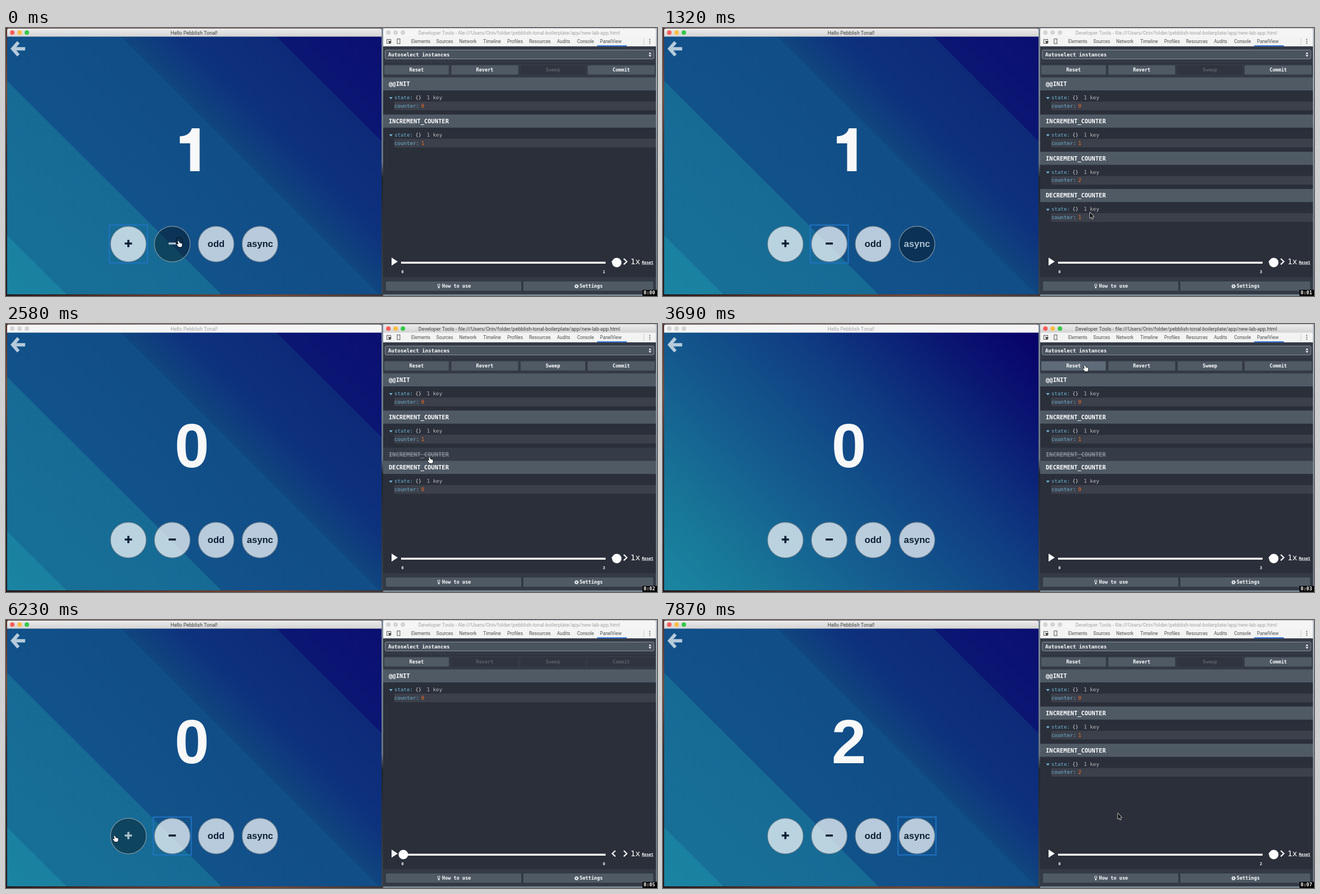
An HTML page with a canvas that plays this animation: 1165x481 px, repeating every 8 s.

```html
<!DOCTYPE html>
<html lang="en">
<head>
<meta charset="utf-8">
<title>Counter and log panel</title>
<style>
html, body { margin: 0; width: 100%; height: 100%; overflow: hidden; background: #333a42; }
canvas { display: block; }
</style>
</head>
<body>
<canvas id="stage" width="1165" height="481"></canvas>
<script>
const c = document.getElementById('stage').getContext('2d');
const LOOP = 8000;
const MONO = '"DejaVu Sans Mono", "Noto Sans Mono", monospace';
const UI = 'Roboto, "Open Sans", sans-serif';
const BOLD = '"Liberation Sans", Arial, sans-serif';
const BG = '#2a2f3a', BAR = '#343a45', BTN = '#4f5a65', BLUE = '#6fb3d2', ORANGE = '#fc6d24';

// Pointer stops: time, x, y of the hot spot
const PATH = [
  [0, 309, 382], [230, 309, 382], [400, 214, 384], [700, 214, 384], [780, 298, 383],
  [1170, 298, 383], [1320, 764, 331], [1480, 843, 302], [1700, 758, 239], [2700, 758, 239],
  [3050, 752, 54], [3370, 755, 74], [4700, 755, 74], [4880, 789, 293], [5500, 789, 293],
  [5850, 172, 391], [6030, 194, 387], [6940, 200, 387], [7100, 200, 387], [7250, 455, 384],
  [7600, 455, 384], [7740, 814, 347], [LOOP, 814, 347]
];
const CLICKS = [-70, 550, 930, 1850, 2120, 4350, 5980, 6330, 6700, 7330];
const TICKS = [1170, 2170, 3170, 4170, 5140, 6330, 7150];
const BUTTONS = [219, 297.5, 376, 454.5];
const ROW = 66.8, HEAD = 23.5, TOP = 88.5;
// A one without a foot, which the bold face lacks
const ONE = new Path2D('M346.5 257H329.5V207H311V194.5Q329 193.5 332.5 180H346.5Z');

function pointer(t) {
  let i = 1;
  while (i < PATH.length - 1 && t > PATH[i][0]) i++;
  const [t0, x0, y0] = PATH[i - 1], [t1, x1, y1] = PATH[i];
  let k = Math.max(0, Math.min(1, (t - t0) / (t1 - t0)));
  k = k * k * (3 - 2 * k);
  return [x0 + (x1 - x0) * k, y0 + (y1 - y0) * k];
}

const inc = n => ({ name: 'INCREMENT_COUNTER', n });
function entries(t) {
  const list = [{ name: '@@INIT', n: 0 }];
  if (t < 4410) {
    list.push(inc(1));
    if (t >= 630) list.push({ ...inc(2), skipped: t >= 2430 });
    if (t >= 1010) list.push({ name: 'DECREMENT_COUNTER', n: t >= 2430 ? 0 : 1 });
  } else {
    if (t >= 6450) list.push(inc(1));
    if (t >= 6820) list.push(inc(2));
  }
  let y = TOP;
  for (const e of list) { e.y = y; y += e.skipped ? HEAD : ROW; }
  return list;
}

function rect(x, y, w, h, color) { c.fillStyle = color; c.fillRect(x, y, w, h); }
function box(x, y, w, h, r, fill, stroke) {
  c.beginPath(); c.roundRect(x, y, w, h, r);
  c.fillStyle = fill; c.fill();
  if (stroke) { c.strokeStyle = stroke; c.lineWidth = 1; c.stroke(); }
}
function disc(x, y, r, color) {
  c.beginPath(); c.arc(x, y, r, 0, 7); c.fillStyle = color; c.fill();
}
function line(color, width, ...p) {
  c.beginPath();
  for (let i = 0; i < p.length; i += 2) c.lineTo(p[i], p[i + 1]);
  c.strokeStyle = color; c.lineWidth = width; c.stroke();
}
function poly(color, ...p) {
  c.beginPath();
  for (let i = 0; i < p.length; i += 2) c.lineTo(p[i], p[i + 1]);
  c.closePath(); c.fillStyle = color; c.fill();
}
function text(s, x, y, font, color, align = 'left') {
  c.font = font; c.fillStyle = color; c.textAlign = align; c.fillText(s, x, y);
}
function shade(x0, y0, x1, y1, stops) {
  const g = c.createLinearGradient(x0, y0, x1, y1);
  stops.forEach(([p, color]) => g.addColorStop(p, color));
  return g;
}
// Diagonal shade, stops given as x - y
const diagonal = stops => shade(0, 478, 567.5, -89.5, stops.map(([d, color]) => [(d + 478) / 1135, color]));

const crisp = diagonal([
  [-478, '#1a84a1'], [-371, '#1a81a0'], [-369, '#176f97'], [-94, '#166b95'], [-92, '#12528a'],
  [189, '#114d87'], [191, '#10467f'], [300, '#0e317d'], [468, '#0d2a79'], [470, '#0b1673'], [657, '#0a0f70']
]);
const smooth = diagonal([
  [-478, '#1a86a2'], [-300, '#187798'], [-93, '#155f90'], [60, '#124f89'],
  [200, '#103f83'], [330, '#0d2c7b'], [470, '#0a1672'], [657, '#080068']
]);

function desktop() {
  rect(0, 0, 1165, 481, shade(0, 0, 0, 481, [[0, '#b4bcc6'], [.5, '#7f8b97'], [1, '#6b7782']]));
  rect(0, 0, 675, 2, shade(0, 0, 675, 0, [[0, '#4a2f2b'], [.5, '#6a4a42'], [1, '#4a4048']]));
  rect(0, 0, 2, 481, shade(0, 0, 0, 481, [[0, '#54302a'], [.25, '#7c4a3a'], [.5, '#35242a'], [1, '#23181c']]));
  rect(672, 0, 3, 481, shade(0, 0, 0, 481, [[0, '#7d8a96'], [.5, '#66737e'], [.56, '#20252c'], [1, '#39434d']]));
  rect(0, 478, 675, 3, shade(0, 0, 675, 0, [[0, '#23181c'], [.3, '#543229'], [.7, '#6f4638'], [1, '#3d3436']]));
  rect(675, 478, 490, 3, '#75848f');
}

function titleBar(x, w, title, active, cx) {
  box(x, 1, w, 18, [3, 3, 0, 0], active ? shade(0, 1, 0, 15, [[0, '#ececec'], [1, '#d4d4d4']]) : '#f5f5f5');
  ['#fc5b57', '#fdbc40', '#34c84a'].forEach((color, i) => disc(x + 9.3 + 13 * i, 8.3, 4, active ? color : '#d4d4d4'));
  text(title, cx, 12, '9px ' + UI, active ? '#3c3c3c' : '#a2a2a2', 'center');
}

function leftWindow(t, active, value, hover) {
  titleBar(2, 670, 'Hello Pebblish Tonal!', active, 336.5);
  rect(2, 15.5, 670, 462.5, t >= 3570 && t < 6030 ? smooth : crisp);
  const pale = '#b6cadb';
  line(pale, 6, 22.2, 25.5, 12, 37.3, 22.2, 49.1);
  line(pale, 6, 13, 37.3, 34.3, 37.3);
  if (value === 1) { c.fillStyle = '#f8f8f8'; c.fill(ONE); }
  else text(value, 332.7, 257, 'bold 111px ' + BOLD, '#f8f8f8', 'center');

  BUTTONS.forEach((x, i) => {
    const over = i === hover, ink = over ? '#a9bfcd' : '#0b2036';
    c.beginPath(); c.arc(x, 387.8, 32, 0, 7);
    c.fillStyle = over ? 'rgba(0,0,0,.37)' : 'rgba(255,255,255,.7)'; c.fill();
    c.strokeStyle = over ? '#8496a2' : '#63788a'; c.lineWidth = 1.2; c.stroke();
    if (i < 2) line(ink, 3.6, x - 6.5, 386.8, x + 6.5, 386.8);
    if (i === 0) line(ink, 3.6, x, 380.3, x, 393.3);
    if (i > 1) text(i === 2 ? 'odd' : 'async', x, 393.3, 'bold 16.6px ' + BOLD, ink, 'center');
  });

  if (active) {
    const focus = t < 930 ? 0 : t < 6330 ? 1 : t < 7330 ? 0 : 3;
    c.strokeStyle = '#2073c2'; c.lineWidth = 2;
    c.strokeRect(BUTTONS[focus] - 34, 353.6, 68, 68);
  }
}

function button(label, x, x1, y, enabled, over) {
  box(x, y, x1 - x, 16.5, 1, enabled ? (over ? '#5f6b78' : BTN) : '#2f343f');
  text(label, (x + x1) / 2, y + 11.3, 'bold 8.6px ' + MONO, enabled ? '#fff' : '#59616b', 'center');
}

function devTools(t, active, list, overReset) {
  titleBar(675, 488, 'Developer Tools - file:///Users/Orin/folder/pebblish-tonal-boilerplate/app/new-lab-app.html', active, 918.5);
  rect(675, 15.5, 488, 17.5, '#f3f3f3');
  rect(675, 32.5, 488, .7, '#c8c8c8');
  c.strokeStyle = '#555'; c.lineWidth = 1;
  c.strokeRect(681.5, 20.5, 7, 7);
  poly('#333', 684, 22.5, 690.5, 25, 687.6, 26, 686.5, 29);
  c.strokeRect(700, 19.5, 5, 8.5);
  const tabs = { Elements: 725, Sources: 770, Network: 811, Timeline: 854, Profiles: 897, Resources: 936, Audits: 986, Console: 1022, PanelView: 1063 };
  for (const name in tabs) text(name, tabs[name], 27, '8.3px ' + UI, '#4c4c4c');
  rect(1058, 31, 53, 2, '#3879d9');
  rect(1141, 18, 1, 12, '#ccc');
  for (const y of [20.5, 24, 27.5]) disc(1152, y, 1, '#555');

  rect(675, 33, 488, 445, BG);
  rect(675, 33, 488, 30, BAR);
  box(678.5, 39.5, 481, 16, 2, '#4a545f', '#89919a');
  text('Autoselect instances', 684, 50.8, 'bold 9.15px ' + MONO, '#fff');
  poly('#fff', 1150, 46.6, 1155, 46.6, 1152.5, 43.4);
  poly('#fff', 1150, 48.6, 1155, 48.6, 1152.5, 51.8);
  rect(675, 64, 488, 24, BAR);
  const changed = list.length > 1;
  button('Reset', 677, 792.5, 67, true, overReset);
  button('Revert', 797, 916.5, 67, changed);
  button('Sweep', 921, 1036.5, 67, list.some(e => e.skipped));
  button('Commit', 1041, 1161, 67, changed);

  for (const { name, n, y, skipped } of list) {
    rect(675, y, 488, HEAD, skipped ? '#353c47' : BTN);
    text(name, 685, y + 15.4, 'bold 10.5px ' + MONO, skipped ? '#858c94' : '#fff');
    if (skipped) { rect(685, y + 11.6, 107, 1, '#858c94'); continue; }
    poly(BLUE, 685.5, y + 35.5, 692, y + 35.5, 688.7, y + 39.5);
    const row = '9.2px ' + MONO;
    text('state:', 695, y + 39.5, row, BLUE);
    text('{}', 732.5, y + 39.5, row, '#d0d0d0');
    text('1 key', 753, y + 39.5, row, '#b8b8b8');
    rect(694.5, y + 43.5, 468.5, 15.5, '#3c404b');
    text('counter:', 695, y + 54.2, row, BLUE);
    text(n, 743, y + 54.2, row, ORANGE);
  }

  poly('#fff', 690, 412, 701, 419.2, 690, 426.4);
  rect(707, 419.5, 366, 3.4, '#fff');
  line('#fff', 2.2, 1090.5, 414, 1085, 419.2, 1090.5, 424.4);
  line('#fff', 2.2, 1105.5, 414, 1111, 419.2, 1105.5, 424.4);
  disc(changed ? 1093 : 711, 421, 8.5, '#fff');
  text('0', 709.5, 440, 'bold 7px ' + MONO, '#fff', 'center');
  text(list.length - 1, 1070, 440, 'bold 7px ' + MONO, '#fff', 'center');
  text('1x', 1117.5, 424, '14.5px ' + MONO, '#fff');
  text('Reset', 1138, 422.5, 'bold 6.8px ' + MONO, '#fff');
  rect(1138, 423.7, 20.5, .8, '#fff');

  rect(675, 447, 488, 31, BAR);
  button('  How to use', 680, 922, 455, true);
  button('  Settings', 926, 1158, 455, true);
  c.strokeStyle = '#fff'; c.lineWidth = 1;
  c.beginPath(); c.arc(774.5, 461.7, 2.1, 0, 7); c.stroke();
  rect(773.3, 464.5, 2.4, 2.5, '#fff');
  c.lineWidth = 2; c.setLineDash([1.2, 1]);
  c.beginPath(); c.arc(1021, 463.6, 2.8, 0, 7); c.stroke();
  c.setLineDash([]); c.lineWidth = 1.4;
  c.beginPath(); c.arc(1021, 463.6, 2, 0, 7); c.stroke();
}

function cursor(x, y, hand, ripple) {
  if (ripple) {
    c.beginPath(); c.arc(x + 1, y - .3, 6, 0, 7);
    c.strokeStyle = '#10161c'; c.lineWidth = 1.2; c.stroke();
  }
  c.save();
  c.translate(x, y);
  c.lineJoin = 'round';
  const shape = new Path2D(hand
    ? 'M-1.5 1Q-.5-.6.7 1L1.7 4L5 4.6Q6.6 5 6 8L5 11H.2L-3.3 7Q-3.5 5.2-1.8 5.8L-.4 6.6Z'
    : 'M0 0V10L2.3 8L4 11.6L5.6 10.9L4 7.4H7Z');
  c.strokeStyle = hand ? '#111' : '#eee';
  c.fillStyle = hand ? '#fff' : '#111';
  c.lineWidth = 1.4;
  c.stroke(shape); c.fill(shape);
  c.restore();
}

function draw(t) {
  const list = entries(t), [x, y] = pointer(t);
  const [hx, hy] = pointer(Math.max(0, t - 95)); // hover trails the pointer
  const hover = BUTTONS.findIndex(b => Math.hypot(hx - b, hy - 388) < 32);
  const overReset = x > 677 && x < 792 && y > 67 && y < 84;
  const overHead = x > 675 && list.some(e => y > e.y && y < e.y + HEAD);
  const overButton = BUTTONS.some(b => Math.hypot(x - b, y - 388) < 32);
  const leftActive = t < 1850 || t >= 5980;

  desktop();
  leftWindow(t, leftActive, list[list.length - 1].n, hover);
  devTools(t, !leftActive, list, overReset);
  rect(1139, 470, 26, 11, '#000');
  text('0:0' + TICKS.filter(k => t >= k).length, 1141, 478.3, 'bold 8.6px ' + MONO, '#fff');
  cursor(x, y, overReset || overHead || overButton, CLICKS.some(k => t >= k && t < k + 120));
}

function loop(now) {
  draw(now % LOOP);
  requestAnimationFrame(loop);
}
requestAnimationFrame(loop);
</script>
</body>
</html>
```
